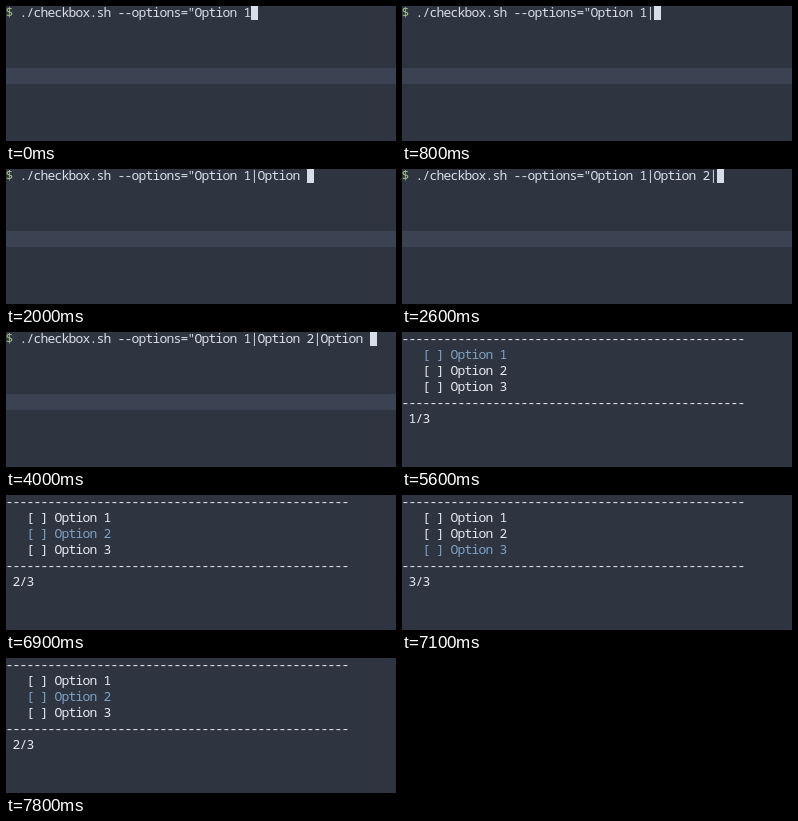
These frames come from a looping animation (390 px wide and 135 px high, 8000 ms). An HTML page with a canvas:

```html
<!DOCTYPE html>
<html lang="en">
<head>
<meta charset="utf-8">
<title>Checkbox prompt</title>
<style>
  html, body { margin: 0; width: 100%; height: 100%; overflow: hidden; background: #2e3440; }
  canvas { display: block; width: 390px; height: 135px; }
</style>
</head>
<body>
<canvas id="term"></canvas>
<script>
const W = 390, H = 135, LOOP = 8000;
const CELL = 7, LINE = 16, BASE = 11;
const C = {
  bg: '#2e3440', band: '#3b4252', text: '#d8dee9',
  bright: '#e5e9f0', green: '#a3be8c', blue: '#81a1c1'
};

const canvas = document.getElementById('term');
const ctx = canvas.getContext('2d');
const dpr = window.devicePixelRatio || 1;
canvas.width = W * dpr;
canvas.height = H * dpr;
ctx.scale(dpr, dpr);

const COMMAND = './checkbox.sh --options="Option 1';
const KEYS = [
  [800, '|'], [1300, 'Option'], [2000, ' '], [2400, '2'], [2600, '|'],
  [3400, 'Option'], [4000, ' '], [4400, '3'], [4900, '"']
];
const MENU_AT = 5600;
const MOVES = [[MENU_AT, 1], [6900, 2], [7100, 3], [7800, 2]];
const RULE = '-'.repeat(49);

function rect(color, x, y, w, h) {
  ctx.fillStyle = color;
  ctx.fillRect(x, y, w, h);
}

// Each character is centred in its terminal cell.
function print(text, col, row, color) {
  ctx.fillStyle = color;
  [...text].forEach((ch, i) => {
    if (ch !== ' ') ctx.fillText(ch, (col + i + 0.5) * CELL, row * LINE + BASE);
  });
}

function drawPrompt(t) {
  const typed = KEYS.filter(([at]) => t >= at).map(([, s]) => s).join('');
  const line = COMMAND + typed;
  rect(C.band, 0, 62, W, 16);
  print('$', 0, 0, C.green);
  print(line, 2, 0, C.text);
  rect(C.text, (2 + line.length) * CELL, 0, CELL, 14);
}

function drawMenu(t) {
  const current = MOVES.filter(([at]) => t >= at).pop()[1];
  print(RULE, 0, 0, C.bright);
  for (let n = 1; n <= 3; n++) {
    print(`[ ] Option ${n}`, 3, n, n === current ? C.blue : C.bright);
  }
  print(RULE, 0, 4, C.bright);
  print(`${current}/3`, 1, 5, C.bright);
}

function draw(t) {
  rect(C.bg, 0, 0, W, H);
  ctx.font = '13px "Noto Sans Mono", "DejaVu Sans Mono", monospace';
  ctx.textAlign = 'center';
  ctx.textBaseline = 'alphabetic';
  if (t < MENU_AT) drawPrompt(t);
  else drawMenu(t);
}

const start = performance.now();
function tick() {
  draw((performance.now() - start) % LOOP);
  requestAnimationFrame(tick);
}
tick();
</script>
</body>
</html>
```
